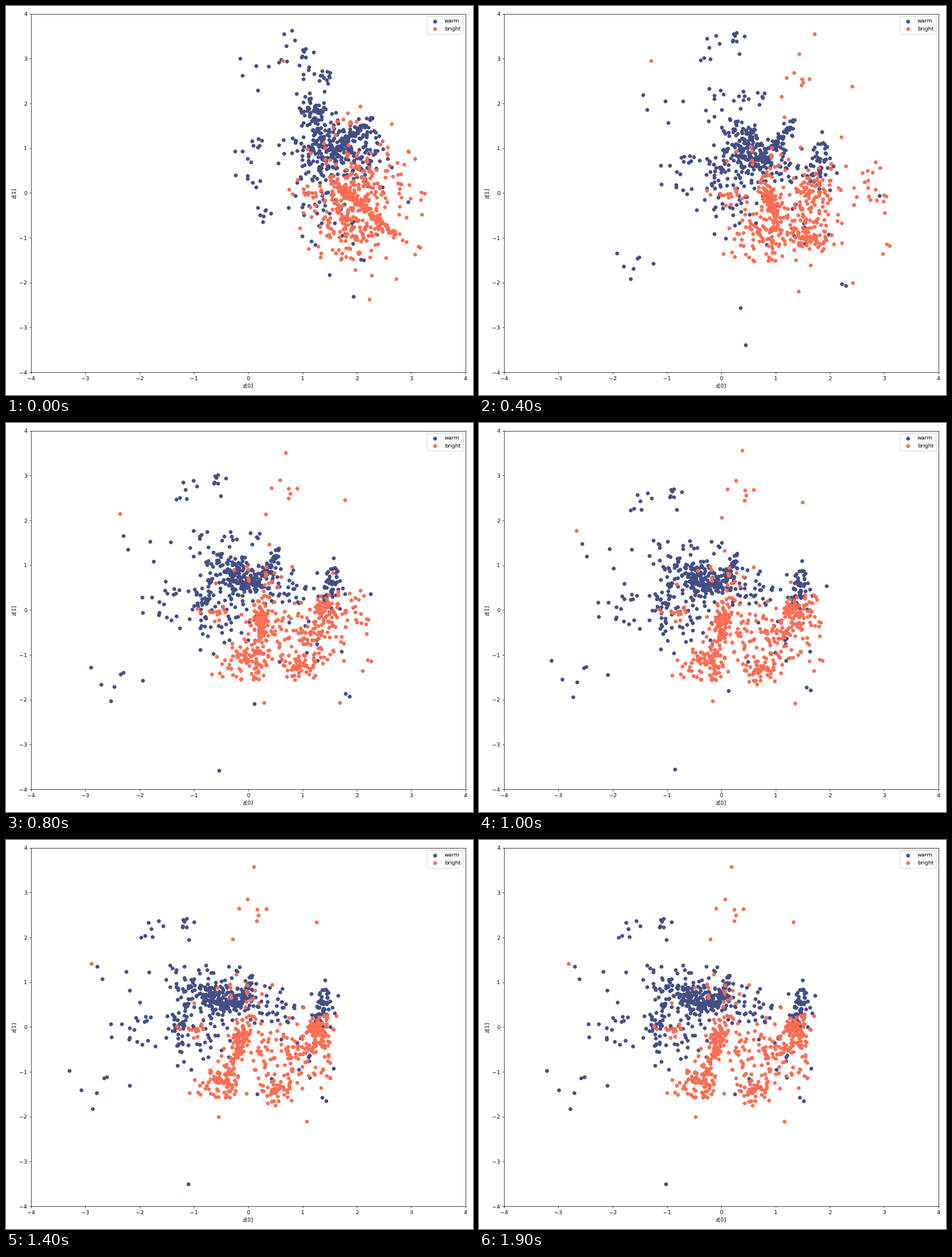
Recreate the animation shown at these times as a matplotlib script. Size 820 by 683 pixels, loop 2000 ms.

```python
import numpy as np
import matplotlib.pyplot as plt
from matplotlib.animation import FuncAnimation

FRAMES, INTERVAL, SETTLED = 20, 100, 14
DPI = 820 / 12
WARM, BRIGHT = "#444e86", "#ff6e54"

plt.rcParams["font.family"] = "DejaVu Sans"
rng = np.random.default_rng(5)
clouds = {WARM: [], BRIGHT: []}

# Quadratic ease-out until settled, then a slow drift to the right.
step = np.arange(FRAMES)[:, None]
ease = 1 - np.clip(1 - step / SETTLED, 0, 1) ** 2
arch = 4 * ease * (1 - ease)
drift = 0.08 * np.clip((step - SETTLED) / 4, 0, 1)


def blend(a, b):
    return a + (b - a) * ease


def cloud(color, n, start, end, size, end_size, bow=(0, 0), tilt=(0, 0)):
    """Normal cloud that moves, bows out midway, reshapes and turns."""
    u, v = rng.normal(size=(2, n))
    u, v = blend(size[0], end_size[0]) * u, blend(size[1], end_size[1]) * v
    a = np.radians(blend(*tilt))
    x = blend(start[0], end[0]) + bow[0] * arch + drift
    y = blend(start[1], end[1]) + bow[1] * arch
    clouds[color].append(np.stack([x + u * np.cos(a) - v * np.sin(a),
                                   y + u * np.sin(a) + v * np.cos(a)], axis=2))


def stray(color, start, end, bow):
    cloud(color, 1, start, end, (0, 0), (0, 0), bow)


# warm: core, streak, ridge, left side, right arm, middle, underside
cloud(WARM, 150, (1.65, 1.05), (-.4, .57), (.27, .27), (.24, .17))
cloud(WARM, 45, (1.95, 1.35), (-.06, .78), (.22, .08), (.19, .04), (.15, .2), (50, 74))
cloud(WARM, 50, (1.18, 1.75), (-.95, .8), (.13, .2), (.22, .15), (.2, 0))
cloud(WARM, 40, (1.15, 1.1), (-1.2, .15), (.17, .25), (.1, .28))
cloud(WARM, 55, (2.2, .75), (1.37, .42), (.18, .3), (.09, .2))
cloud(WARM, 40, (1.6, .65), (.5, .4), (.28, .25), (.28, .28))
cloud(WARM, 40, (1.25, -.15), (-.9, -.3), (.25, .5), (.4, .35))
cloud(WARM, 10, (1.8, -.5), (1, -.5), (.3, .4), (.3, .4))

# warm fringe: far left, crown, knots, then loose groups
cloud(WARM, 18, (.15, .8), (-1.95, 0), (.17, .35), (.25, .2), (.25, .1))
cloud(WARM, 14, (1.1, 2.3), (-1.2, 1.1), (.2, .3), (.3, .15), (0, .2))
cloud(WARM, 10, (1.4, 2.6), (-.6, 1.25), (.07, .1), (.3, .1), (.1, .2))
cloud(WARM, 8, (1.05, 3), (-1.15, 2.2), (.07, .15), (.07, .15), (.3, .75))
cloud(WARM, 7, (.65, 3.2), (-1.85, 2.15), (.15, .4), (.2, .2), (.3, .5))
cloud(WARM, 5, (0, 2.8), (-2.5, 1.2), (.25, .2), (.45, .15))
cloud(WARM, 7, (.26, -.41), (-2.9, -1.2), (.13, .13), (.6, .35), (-.4, -.7))
cloud(WARM, 2, (2.1, -1.5), (1.4, -1.65), (.05, .02), (.06, .12), (.5, -.5))
stray(WARM, (1.94, -2.31), (-1.1, -3.5), (0, -.5))
stray(WARM, (1.5, -1.82), (.17, -1.5), (-.5, -.9))
stray(WARM, (2.94, -.2), (1.65, .7), (.6, -.3))

# bright: spine, tail, lower left, floor, middle, right side, arm
cloud(BRIGHT, 95, (1.85, -.05), (-.15, -.25), (.28, .04), (.28, .08), (0, 0), (-46, -102))
cloud(BRIGHT, 50, (2.45, -.65), (.53, -1.4), (.3, .04), (.2, .18), (.1, 0), (-50, 0))
cloud(BRIGHT, 55, (1.75, -.7), (-.4, -1.1), (.25, .4), (.12, .25), (.2, 0))
cloud(BRIGHT, 35, (1.6, -.6), (-.65, -1.25), (.25, .4), (.22, .14))
cloud(BRIGHT, 60, (1.8, -.1), (.38, -.5), (.36, .4), (.3, .32))
cloud(BRIGHT, 45, (2.15, -1), (.9, -.65), (.25, .35), (.2, .3))
cloud(BRIGHT, 60, (2.2, .2), (1.28, -.05), (.3, .38), (.14, .15))
cloud(BRIGHT, 22, (2.3, -.3), (1.35, -.65), (.4, .4), (.1, .25))

# bright fringe: left, overlap, right, lower right, top
cloud(BRIGHT, 15, (1.15, -.1), (-1, -.1), (.15, .4), (.12, .26))
cloud(BRIGHT, 18, (1.85, .8), (0, .75), (.4, .3), (.3, .2))
cloud(BRIGHT, 20, (2.85, .2), (1.35, -.2), (.28, .4), (.1, .25), (.65, .1))
cloud(BRIGHT, 3, (3.1, -1.2), (1.4, -1.1), (.05, .1), (.08, .15), (.75, 0))
cloud(BRIGHT, 12, (1.9, 1.55), (.2, 2.4), (.28, .15), (.4, .75), (.45, .45))
stray(BRIGHT, (.64, 2.95), (-2.89, 1.42), (-.2, .75))
stray(BRIGHT, (2.23, -2.37), (-.55, -2), (.55, 0))
stray(BRIGHT, (2.72, -1.91), (1.08, -2.1), (.5, 0))

fig, ax = plt.subplots(figsize=(12, 9.996), dpi=DPI)
layers = []
for color, label in ((WARM, "warm"), (BRIGHT, "bright")):
    pts = np.concatenate(clouds[color], axis=1)
    layers.append((ax.scatter(*pts[0].T, color=color, label=label), pts))
ax.set(xlim=(-4, 4), ylim=(-4, 4), xlabel="z[0]", ylabel="z[1]")
ax.legend(loc="upper right")
fig.tight_layout()
fig.subplots_adjust(bottom=39.9 / 683)


def draw(i):
    for dots, pts in layers:
        dots.set_offsets(pts[i])
    return [dots for dots, _ in layers]


anim = FuncAnimation(fig, draw, frames=FRAMES, interval=INTERVAL,
                     init_func=lambda: draw(0), repeat=True, repeat_delay=0)
plt.show()
```
